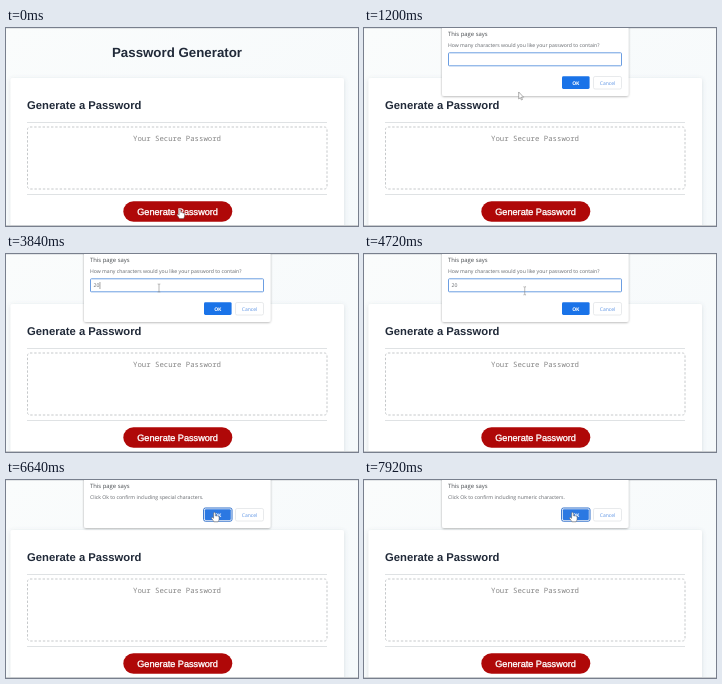
These frames come from a looping animation (352 px wide and 198 px high, 8 s). An HTML page:

```html
<!DOCTYPE html>
<html lang="en">
<head>
<meta charset="utf-8">
<title>Password Generator</title>
<style>
  html, body { margin: 0; width: 100%; height: 100%; overflow: hidden; background: #f8fafb; }
  svg { display: block; width: 100vw; height: 100vh; }
  text { text-rendering: geometricPrecision; white-space: pre; }
  .head { font-family: "Liberation Sans", Arial, sans-serif; font-weight: 700; fill: #212a39; }
  .press { font: 9.15px "Liberation Sans", Arial, sans-serif; fill: #fff; stroke: #fff; stroke-width: .35; }
  .mono { font: 7.33px "Noto Sans Mono", "DejaVu Sans Mono", monospace; fill: #858585; }
  .ui { font: 5.13px "Open Sans", "Noto Sans", sans-serif; fill: #64686d; }
  .says { font-size: 5.9px; fill: #4a4e52; }
  .ok { font-size: 5px; font-weight: 700; fill: #fff; }
  .cancel { font-size: 5px; fill: #5a92e4; }
  .mid { text-anchor: middle; }
  .rule { stroke: #dfe2e4; stroke-width: 1; }
</style>
</head>
<body>
<svg viewBox="0 0 352 198" preserveAspectRatio="none">
  <defs>
    <linearGradient id="page" x2="1" y2="1">
      <stop offset="0" stop-color="#fafcfc"/>
      <stop offset="1" stop-color="#f5f9fb"/>
    </linearGradient>
    <filter id="soft" x="-10%" y="-10%" width="120%" height="130%">
      <feDropShadow dx="0" dy="1" stdDeviation="2" flood-color="#5a6b78" flood-opacity=".2"/>
    </filter>
    <filter id="lift" x="-10%" y="-20%" width="120%" height="150%">
      <feDropShadow dx="0" dy=".6" stdDeviation="1.2" flood-color="#000" flood-opacity=".34"/>
    </filter>
    <g id="cancelBtn">
      <rect x="229.5" y="48.5" width="28" height="12.5" rx="1.6" fill="#fff" stroke="#e2e5e8" stroke-width=".8"/>
      <text class="ui cancel mid" x="243.5" y="56.6">Cancel</text>
    </g>
  </defs>

  <rect width="352" height="198" fill="url(#page)"/>
  <rect width="352" height="1" fill="#e3e6e8"/>
  <text class="head mid" x="171" y="28.7" font-size="13.3">Password Generator</text>
  <rect x="4.5" y="50" width="333.5" height="160" rx="2" fill="#fff" filter="url(#soft)"/>
  <text class="head" x="21" y="81.2" font-size="11.25">Generate a Password</text>
  <path class="rule" d="M21 94.5H321M21 166.5H321"/>
  <rect x="21.5" y="99" width="299.5" height="62" rx="2.5" fill="#fff" stroke="#c6c9cb" stroke-dasharray="2.4 1.8"/>
  <text class="mono mid" x="171" y="113.4">Your Secure Password</text>
  <rect x="117.3" y="173.2" width="109" height="20.5" rx="10.25" fill="#af0808"/>
  <text class="press mid" x="171.6" y="186.6">Generate Password</text>
  <rect y="197" width="352" height="1" fill="#c9cccf"/>

  <g id="ask">
    <rect x="78" y="-8" width="186.5" height="76" rx="2" fill="#fff" filter="url(#lift)"/>
    <text class="ui says" x="84" y="8">This page says</text>
    <text class="ui" x="84" y="19.2">How many characters would you like your password to contain?</text>
    <rect x="84.5" y="24.8" width="173" height="13" rx=".8" fill="#fff" stroke="#6c9ee2"/>
    <text class="ui" id="typed" x="87.6" y="33.2"></text>
    <rect id="caret" y="28" width=".6" height="7" fill="#666"/>
    <rect id="askOk" x="198" y="48.2" width="27.6" height="12.8" rx="1.4"/>
    <text class="ui ok mid" x="211.8" y="56.6">OK</text>
    <use href="#cancelBtn"/>
  </g>

  <g id="confirm">
    <rect x="78" y="-8" width="186.5" height="56" rx="2" fill="#fff" filter="url(#lift)"/>
    <text class="ui says" x="84" y="8">This page says</text>
    <text class="ui" id="question" x="84" y="19.2"></text>
    <rect x="197.6" y="28" width="28.4" height="13.2" rx="1.8" fill="#fff" stroke="#2f6fca"/>
    <rect x="198.8" y="29.2" width="26" height="10.8" rx="1" fill="#2b78e2"/>
    <text class="ui ok mid" x="211.8" y="36.6">OK</text>
    <use href="#cancelBtn" y="-20"/>
  </g>

  <g id="pointer">
    <path id="arrow" d="M0 0V7L1.6 5.6L2.7 8L3.8 7.5L2.7 5.2H4.9Z" fill="#fff" stroke="#777" stroke-width=".6"/>
    <path id="hand" d="M-.9 .7Q0 -.5 .8 .7V3.6Q1.6 3 2.2 3.8Q3 3.3 3.5 4.1Q4.5 3.8 4.6 4.9V7Q4.3 8.4 3.6 9.6H-.6Q-1.4 8.1 -2.9 6.2Q-3.1 4.9 -1.9 5.2L-.9 6.1Z" fill="#fff" stroke="#555" stroke-width=".5"/>
    <path id="beam" d="M-1.3 -4H-.3L0 -3.6L.3 -4H1.3M0 -3.6V3.6M-1.3 4H-.3L0 3.6L.3 4H1.3" fill="none" stroke="#888" stroke-width=".6"/>
  </g>
</svg>
<script>
const LOOP = 8000, BLINK = 530;
const OPEN = 480, TYPE_2 = 3640, TYPE_0 = 3760, SPECIAL = 5760, NUMERIC = 7440;
const $ = id => document.getElementById(id);
const show = (id, on) => $(id).setAttribute("visibility", on ? "inherit" : "hidden");

// time, x, y of the pointer's hot spot
const path = [
  [0, 174, 181], [960, 174, 181],
  [1200, 154.7, 64], [1600, 153, 34],
  [4560, 153, 34], [5200, 202, 51.8],
  [5800, 202, 51.8], [6160, 208.5, 32.2],
  [LOOP, 208.5, 32.2]
];

function pointerAt(t) {
  const i = path.findIndex(p => p[0] > t);
  const [t0, x0, y0] = path[i - 1], [t1, x1, y1] = path[i];
  const u = (t - t0) / (t1 - t0), k = u * u * (3 - 2 * u);
  return [x0 + (x1 - x0) * k, y0 + (y1 - y0) * k];
}

const inside = (x, y, l, t, r, b) => x >= l && x <= r && y >= t && y <= b;

function draw(t) {
  const asking = t >= OPEN && t < SPECIAL, confirming = t >= SPECIAL;
  const [x, y] = pointerAt(t);
  show("ask", asking);
  show("confirm", confirming);

  const text = t < TYPE_2 ? "" : t < TYPE_0 ? "2" : "20";
  const since = t - (t < TYPE_2 ? OPEN : t < TYPE_0 ? TYPE_2 : TYPE_0);
  $("typed").textContent = text;
  $("caret").setAttribute("x", 87.8 + text.length * 2.93);
  show("caret", asking && Math.floor(since / BLINK) % 2 === 0);

  const kind = t < NUMERIC ? "special" : "numeric";
  $("question").textContent = `Click Ok to confirm including ${kind} characters.`;

  const overOk = asking && inside(x, y, 198, 48, 226, 61);
  $("askOk").setAttribute("fill", overOk ? "#4386e3" : "#1a73e8");
  const overPill = inside(x, y, 117, 173, 226, 194);
  const hand = overPill || overOk || (confirming && inside(x, y, 198, 28, 226, 41));
  const beam = asking && inside(x, y, 84, 25, 258, 38);
  show("hand", hand);
  show("beam", beam);
  show("arrow", !hand && !beam);
  $("pointer").setAttribute("transform", `translate(${x} ${y})`);
}

const start = performance.now();
function tick() {
  draw((performance.now() - start) % LOOP);
  requestAnimationFrame(tick);
}
draw(0);
requestAnimationFrame(tick);
</script>
</body>
</html>
```
